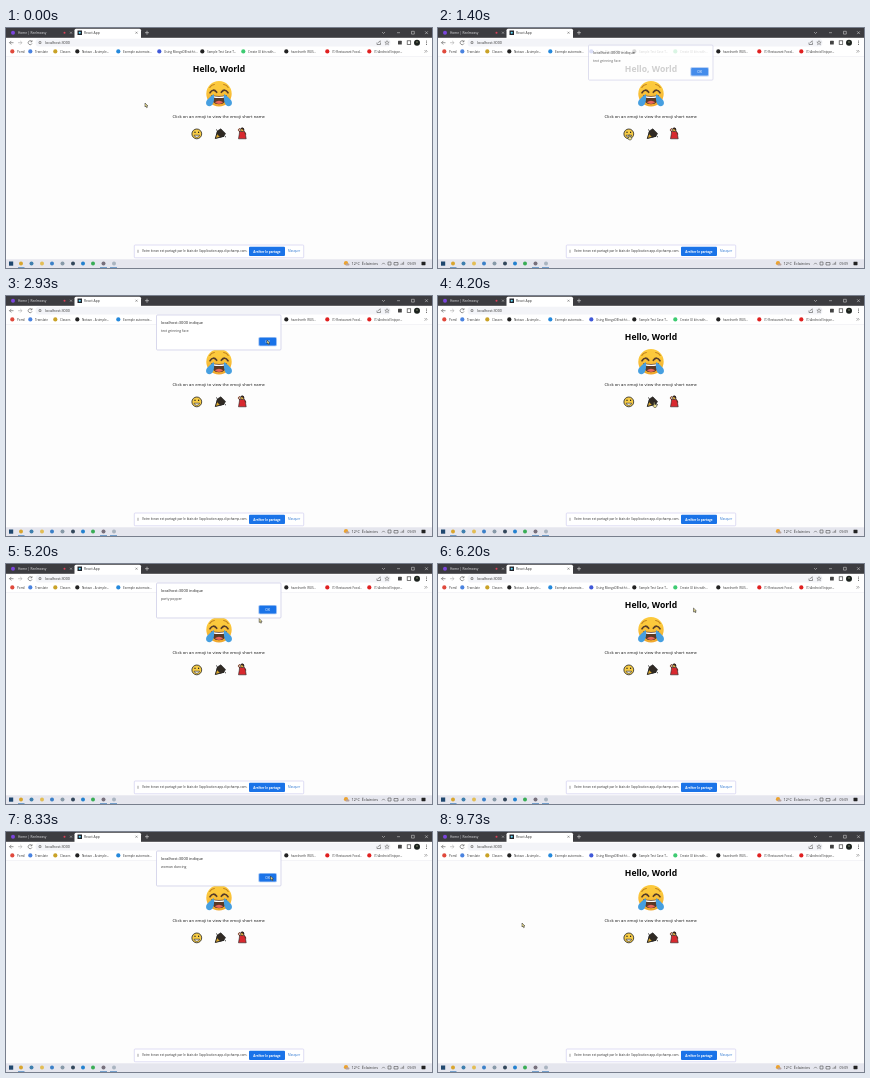
Recreate the animation shown at these times as an HTML page. Size 426 px wide and 240 px high, loop 9790 ms.

```html
<!DOCTYPE html>
<html lang="fr">
<head>
<meta charset="utf-8">
<title>React App</title>
<style>
html, body { margin: 0; width: 100%; height: 100%; overflow: hidden; background: #fdfdfd; }
svg { display: block; width: 100vw; height: 100vh; }
text { font-family: "Open Sans", "Noto Sans", sans-serif; white-space: pre; }
</style>
</head>
<body>
<svg viewBox="0 0 426 240">
  <g id="chrome"></g>

  <g id="page">
    <text x="213" y="44.3" font-size="8.6" font-weight="700" text-anchor="middle">Hello, World</text>
    <g id="joy" fill="none" stroke-linecap="round">
      <linearGradient id="skin" x2="0" y2="1">
        <stop offset=".3" stop-color="#fcc93c"/><stop offset="1" stop-color="#f0a62c"/>
      </linearGradient>
      <circle cx="213" cy="65.8" r="12.7" fill="url(#skin)"/>
      <path d="M203.8 59.5q1.5-2.8 4.5-3M222.200 59.500q-1.500-2.800-4.500-3" stroke="#c0801f" stroke-width="1.100"/>
      <path d="M204 64.800q3.200-5 6.700-.5M222 64.800q-3.200-5-6.700-.5" stroke="#553b28" stroke-width="1.600"/>
      <path d="M205.200 67.300q7.800 1.600 15.600 0q.2 9-7.800 9t-7.800-9z" fill="#5b3923"/>
      <path d="M206.500 68q6.500 1.300 13 0l-.5 1.500q-6 1.100-12 0z" fill="#fff"/>
      <path d="M208.800 74.300q4.200-3.200 8.400 0q-4.200 3.400-8.400 0z" fill="#e8645a"/>
      <path id="tear" d="M207.800 66c1 7.500-.8 12-4.500 12.200c-3.200 0-4.200-3.500-2.200-6.200q2.600-3 6.700-6z" fill="#469fe0"/>
      <use href="#tear" transform="translate(426) scale(-1 1)"/>
    </g>
    <text x="212.8" y="89.6" font-size="4.26" text-anchor="middle" fill="#111">Click on an emoji to view the emoji short name</text>
    <g id="grin" stroke="#222">
      <circle cx="190.800" cy="105.900" r="4.900" fill="#f7cc45" stroke-width=".8"/>
      <path d="M188 107.200h5.600q-.6 2.100-2.800 2.100t-2.800-2.100z" fill="#fff" stroke-width=".6"/>
      <path d="M189 104v.5M192.600 104v.5" stroke-width="1.200" stroke-linecap="round"/>
    </g>
    <g id="popper" stroke="#222" stroke-linejoin="round">
      <path d="M209.300 110.500l2.300-7.500q4.200 1.800 6.400 5.200z" fill="#d9a62c" stroke-width="1"/>
      <path d="M210.800 105.500l.8-2.700l3.200-2l4.700 4.600l-1.500 2.800l-3.500 1z" fill="#302a24" stroke-width=".6"/>
      <path d="M210 101.500l1.200 1M219 108.500l1 .5" stroke="#333" stroke-width=".9"/>
    </g>
    <g id="dancer" stroke="#222" stroke-linejoin="round">
      <path d="M234 104l-1.700-2l1.500-1.700M238.500 104l1.500 2.500" fill="none" stroke="#7c3c22" stroke-width="1.100"/>
      <path d="M233.600 103.200h4.800l1 2.900l.8 4.700h-7.700l.8-4.700z" fill="#d8292f" stroke-width=".6"/>
      <circle cx="236.200" cy="101.900" r="1.700" fill="#e9b446" stroke-width=".6"/>
      <path d="M234.300 101.600q.2-2.200 2.200-2q2.100.2 1.700 2.800q-1.600-.3-2.100-1.500z" fill="#332520" stroke="none"/>
    </g>
  </g>

  <g id="desktop"></g>

  <g id="dialog">
    <rect x="150.500" y="19" width="124.500" height="35" rx="1" fill="#fff" stroke="#c8c8e4" stroke-width=".7"/>
    <text x="155" y="28.300" font-size="4" fill="#222">localhost:3000 indique</text>
    <text id="message" x="155" y="36" font-size="3.450" fill="#444"></text>
    <rect x="252.300" y="41" width="18.700" height="9.300" rx="1.500" fill="#a9c8f5"/>
    <rect x="253.200" y="41.800" width="16.900" height="7.700" rx="1" fill="#1a73e8"/>
    <text x="261.700" y="46.900" font-size="3.400" text-anchor="middle" fill="#fff">OK</text>
  </g>

  <g id="cursor" stroke="#222" stroke-width=".5" stroke-linejoin="round" fill="#f1e596">
    <path id="arrow" d="M0 0v4l.9-.8l.7 1.500l.8-.4l-.7-1.400h1.200z"/>
    <path id="hand" d="M-.3 0q.6-.6 1 0v1.800l2 .4v1.600l-.7 1.100h-2l-1.500-1.900l.5-.5l.7.500z"/>
  </g>
</svg>
<script>
const $ = id => document.getElementById(id);
const rect = (x, y, w, h, fill, r = 0, extra = '') =>
  `<rect x="${x}" y="${y}" width="${w}" height="${h}" rx="${r}" fill="${fill}" ${extra}/>`;
const dot = (x, y, r, fill) => `<circle cx="${x}" cy="${y}" r="${r}" fill="${fill}"/>`;
const label = (x, y, size, text, fill = '#333', extra = '') =>
  `<text x="${x}" y="${y}" font-size="${size}" fill="${fill}" ${extra}>${text}</text>`;
const line = (d, stroke = '#555', width = .6) =>
  `<path d="${d}" fill="none" stroke="${stroke}" stroke-width="${width}"/>`;
const cross = (x, y, s, color) =>
  line(`M${x - s} ${y - s}l${2 * s} ${2 * s}m0 ${-2 * s}l${-2 * s} ${2 * s}`, color, .5);

const bookmarks = [
  [11, 'Pomil', '#e0493c'], [29, 'Translate', '#4a83e0'], [54, 'Classes', '#c9a227'],
  [76, 'Notavo - A simple...', '#222'], [117, 'Exemple automate...', '#2589dc'],
  [158, 'Using MongoDB with t...', '#4059d8'], [201, 'Sample Test Case T...', '#222'],
  [242, 'Create UI kits with...', '#3ecb72'], [285, 'hazelnorth (RUS...', '#222'],
  [326, '(1) Restaurant Food...', '#e02020'], [368, '(1) Android Snippe...', '#e02020']
];

$('chrome').innerHTML =
  rect(0, 0, 426, 10, '#3c3c40') +
  dot(7, 4.7, 2, '#7b45dd') + label(12, 5.9, 3.2, 'Home | Reelmossy', '#e8e8ea') +
  dot(58.5, 4.7, 1, '#dc4058') + cross(65, 4.7, 1, '#ccc') +
  rect(68.5, .8, 66.5, 10, '#fff', 1.5) +
  rect(71.5, 2.5, 4.5, 4.5, '#20232a') + dot(73.75, 4.75, 1.1, '#61dafb') +
  label(78, 5.9, 3.4, 'React App') + cross(130.5, 4.7, 1, '#555') +
  line('M139 4.7h4m-2-2v4', '#ddd') +
  line('M376 4l1.500 1.500l1.500-1.500M391 4.700h3M405.500 3.300h2.800v2.800h-2.800z', '#ddd', .5) +
  cross(420.5, 4.7, 1.4, '#ddd') +
  rect(0, 9.8, 426, 19, '#fff') +
  line('M7.500 14.700h-4m1.800-1.800l-1.800 1.800l1.800 1.800') +
  line('M12 14.700h4m-1.800-1.800l1.800 1.800l-1.800 1.800', '#aaa') +
  line('M25.800 13.600a2 2 0 1 0 .2 1.800m0-3.200v1.600h-1.600') +
  rect(29.5, 10.8, 355, 7.8, '#f3f4f8', 3.9) +
  dot(34, 14.7, 1.4, '#666') + dot(34, 14.7, .8, '#f1f3f4') +
  label(39, 16, 3.7, 'localhost:3000') +
  line('M371 14.500v2h3.500v-2m-2 .5q0-2 2.500-2') +
  line('M381 12.600l.6 1.500h1.600l-1.300 1l.5 1.600l-1.400-1l-1.400 1l.5-1.600l-1.300-1h1.600z', '#555', .45) +
  rect(392, 12.8, 3.8, 3.7, '#444', .5) +
  rect(401.2, 12.8, 3.5, 3.7, '#fff', 0, 'stroke="#444" stroke-width=".7"') +
  dot(411, 14.7, 3, '#1c221e') + dot(411, 14, 1, '#59604f') +
  [12.9, 14.7, 16.5].map(y => dot(420.5, y, .5, '#444')).join('') +
  bookmarks.map(([x, text, color]) =>
    dot(x - 4.7, 23.4, 2.1, color) + label(x, 24.5, 3.02, text)).join('') +
  line('M418.500 22l1.200 1.300l-1.200 1.300m1.500-2.600l1.200 1.300l-1.200 1.300', '#444', .4) +
  line('M0 28.500h426', '#e9e9ee', .5);

const taskIcons = [
  [15, '#d9a52e'], [25.5, '#3f7fae'], [36, '#e3bd55'], [46, '#3c80c8'], [56.5, '#8799a8'],
  [67, '#33475b'], [77, '#2381cf'], [87, '#39ad55'], [97.5, '#77707c'], [108, '#a9b4c0']
];

$('desktop').innerHTML =
  rect(128.3, 217, 169.4, 12.8, '#fff', .8, 'stroke="#d2cef0" stroke-width=".7"') +
  line('M131.500 221.800v3m1-3v3', '#888', .4) +
  label(136, 224.4, 3.2, "Votre écran est partagé par le biais de l'application app.clipchamp.com.") +
  rect(243, 218.8, 36, 9.2, '#1a73e8', 1) +
  label(261, 224.5, 3.05, 'Arrêter le partage', '#fff', 'font-weight="700" text-anchor="middle"') +
  label(282, 224.4, 2.95, 'Masquer', '#2874d0') +
  rect(0, 231.3, 426, 8.7, '#e5e6ee') +
  rect(3, 233.5, 4.2, 4.2, '#20486f') +
  taskIcons.map(([x, color]) => dot(x, 235.6, 2, color)).join('') +
  line('M12 239.600h6.500M94 239.600h7m3 0h7', '#3478b8', .7) +
  dot(340, 235.2, 2.1, '#eca22d') + rect(339.5, 235.5, 4, 2, '#b7a3a0', 1) +
  label(345.5, 236.9, 3.8, '12°C  Éclaircies') +
  line('M376 236.400l1.500-1.500l1.500 1.500M382 234h3v3h-3zM388 234.500h4v2.500h-4zM395 236.800v-1m1.300 1v-2m1.300 2v-3', '#444', .55) +
  label(401.5, 236.9, 3.3, '09:09') +
  rect(415.5, 233.7, 4, 3.5, '#222', .4);

const LOOP = 9790;
const dialogs = [
  [1320, 3080, 'text grinning face'],
  [4480, 6060, 'party popper'],
  [7340, 8490, 'woman dancing']
];
const path = [
  [0, 139, 75], [300, 141, 77], [1060, 191, 107], [1650, 191, 107], [2450, 261, 44],
  [3100, 261, 44], [3850, 216, 106.5], [4600, 216, 106.5], [5400, 260, 45], [6000, 258, 45],
  [6200, 255.5, 44], [6950, 236, 107], [7450, 236, 107], [8130, 264.5, 44],
  [8520, 264.5, 44], [9350, 84, 91], [LOOP, 84, 91]
];

function cursorAt(t) {
  const i = path.findIndex(p => p[0] > t);
  const [t0, x0, y0] = path[i - 1], [t1, x1, y1] = path[i];
  const u = (t - t0) / (t1 - t0), ease = u * u * (3 - 2 * u);
  return [x0 + (x1 - x0) * ease, y0 + (y1 - y0) * ease];
}

function draw(now) {
  const t = now % LOOP;
  const open = dialogs.find(([start, end]) => t >= start && t < end);
  const shown = open ? Math.min(1, (t - open[0]) / 100) : 0;
  $('dialog').setAttribute('opacity', shown);
  $('dialog').setAttribute('transform', `translate(0 ${(shown - 1) * 10})`);
  if (open) $('message').textContent = open[2];

  const [x, y] = cursorAt(t);
  const overEmoji = y > 100 && [191, 214, 236].some(cx => Math.abs(x - cx) < 6);
  $('cursor').setAttribute('transform', `translate(${x} ${y})`);
  $('hand').setAttribute('visibility', overEmoji ? 'visible' : 'hidden');
  $('arrow').setAttribute('visibility', overEmoji ? 'hidden' : 'visible');
}

const start = performance.now();
(function tick() {
  draw(performance.now() - start);
  requestAnimationFrame(tick);
})();
</script>
</body>
</html>
```
